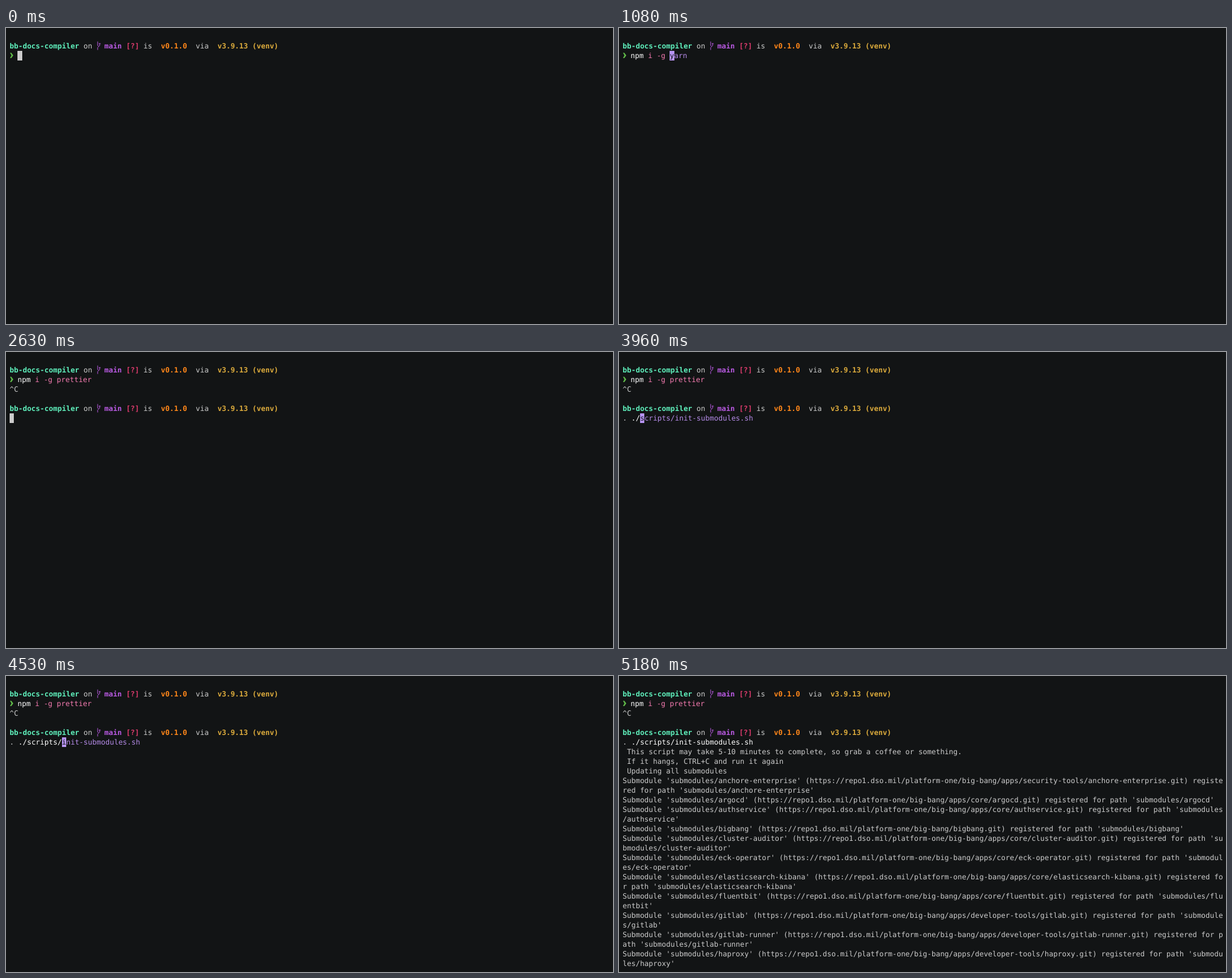
An HTML page for the animation above (8000 ms loop, 1008x492 px).

```html
<!DOCTYPE html>
<html lang="en">
<head>
<meta charset="utf-8">
<title>Terminal session</title>
<style>
  html, body { margin: 0; width: 100%; height: 100%; overflow: hidden; background: #121415; }
  pre {
    position: absolute; left: 6px; top: 6px; margin: 0;
    font: 12px/16px "DejaVu Sans Mono", monospace;
    font-variant-ligatures: none;
    text-rendering: geometricPrecision;
    color: #ccc;
  }
  b { font-weight: 700; }
  svg { height: 16px; vertical-align: top; overflow: visible; }
  .project { color: #5ff0bc; }
  .branch { color: #b95ae2; }
  .status { color: #d93a6b; }
  .package { color: #ff871a; }
  .python { color: #dcab3c; }
  .command { color: #fff; }
  .argument { color: #f47bb0; }
  .hint { color: #b58be8; }
  .cursor { padding: 1px 0; background: #ccc; color: #121415; }
  .hint.cursor { background: #b794f6; color: #121415; }
</style>
</head>
<body>
<pre id="screen"></pre>
<script>
const LOOP = 8000;
const COLUMNS = 138;
const screenEl = document.getElementById('screen');

const span = (cls, text) => text && `<span class="${cls}">${text}</span>`;
const bold = (cls, text) => `<b class="${cls}">${text}</b>`;
const CURSOR = span('cursor', ' ');

const branchIcon = '<svg width="5.6"><path d="M1.2 .5V7M1.2 14.5V10.5L4.6 7V3.5M3.2 4.5L4.6 3L6 4.5M1.2 7L2.6 8.5" fill="none" stroke="#b95ae2"/></svg>';
const chevron = '<svg width="6.06"><path d="M.6 3.3H2.9L6.1 7.6 2.9 11.9H.6L3 7.6Z" fill="#5fb848"/></svg>';

const header = bold('project', 'bb-docs-compiler') + ' on ' + branchIcon +
  bold('branch', ' main ') + bold('status', '[?]') + ' is  ' +
  bold('package', 'v0.1.0') + '  via  ' + bold('python', 'v3.9.13 (venv)');

// Colours the first `split` characters differently from the rest.
const paint = (text, split, first, rest) =>
  span(first, text.slice(0, split)) + span(rest, text.slice(split));
const npmLine = text => paint(text, 4, 'command', 'argument');
const scriptLine = text => paint(text, 2, '', 'command');

// Typed text, then the cursor on the first character of the suggested remainder.
const edit = (color, typed, suggestion = '') => {
  const rest = suggestion.slice(typed.length);
  return color(typed) +
    (rest ? span('hint cursor', rest[0]) + span('hint', rest.slice(1)) : CURSOR);
};

const install = 'npm i -g prettier';
const script = '. ./scripts/init-submodules.sh';
const firstPrompt = '\n' + header + '\n' + chevron + ' ';
const interrupted = firstPrompt + npmLine(install) + '\n^C\n';
const secondPrompt = interrupted + '\n' + header + '\n';
const notices = secondPrompt + scriptLine(script) + '\n' + [
  ' This script may take 5-10 minutes to complete, so grab a coffee or something.',
  ' If it hangs, CTRL+C and run it again',
  ' Updating all submodules'
].join('\n') + '\n';

const submodules = [
  'apps/security-tools/anchore-enterprise', 'apps/core/argocd', 'apps/core/authservice',
  'bigbang', 'apps/core/cluster-auditor', 'apps/core/eck-operator',
  'apps/core/elasticsearch-kibana', 'apps/core/fluentbit', 'apps/developer-tools/gitlab',
  'apps/developer-tools/gitlab-runner', 'apps/developer-tools/haproxy'
];
const wrap = line => line.match(new RegExp(`.{1,${COLUMNS}}`, 'g')).join('\n');
const registration = repo => {
  const path = `'submodules/${repo.split('/').pop()}'`;
  return wrap(`Submodule ${path} (https://repo1.dso.mil/platform-one/big-bang/${repo}.git) registered for path ${path}`);
};

const timeline = [[0, firstPrompt + CURSOR]];
const show = (time, content) => timeline.push([time, content]);
const typeNpm = (time, length, suggestion) =>
  show(time, firstPrompt + edit(npmLine, (install + ' ').slice(0, length), suggestion));
const typeScript = (time, length) =>
  show(time, secondPrompt + edit(scriptLine, script.slice(0, length), script));

for (let i = 0; i < 5; i++) {
  typeNpm(260 + i * 60, i + 1, i < 4 ? 'npm run validate' : 'npm i -g yarn');
}
[[830, 6], [1020, 8], [1080, 9]].forEach(([time, length]) => typeNpm(time, length, 'npm i -g yarn'));
[10, 11, 13, 14, 16, 17].forEach((length, i) => typeNpm(1270 + i * 60, length));
typeNpm(2300, 18);
show(2500, interrupted + CURSOR);
show(2630, secondPrompt + CURSOR);
typeScript(3960, 4);
[5, 6, 8, 9, 11].forEach((length, i) => typeScript(4090 + i * 60, length));
typeScript(4530, 12);
typeScript(4920, script.length);
show(5120, notices + CURSOR);
show(5180, notices + submodules.map(registration).join('\n'));

let shown;
const start = performance.now();
function draw() {
  const time = (performance.now() - start) % LOOP;
  const content = timeline.findLast(([at]) => at <= time)[1];
  if (content !== shown) screenEl.innerHTML = shown = content;
  requestAnimationFrame(draw);
}
draw();
</script>
</body>
</html>
```
